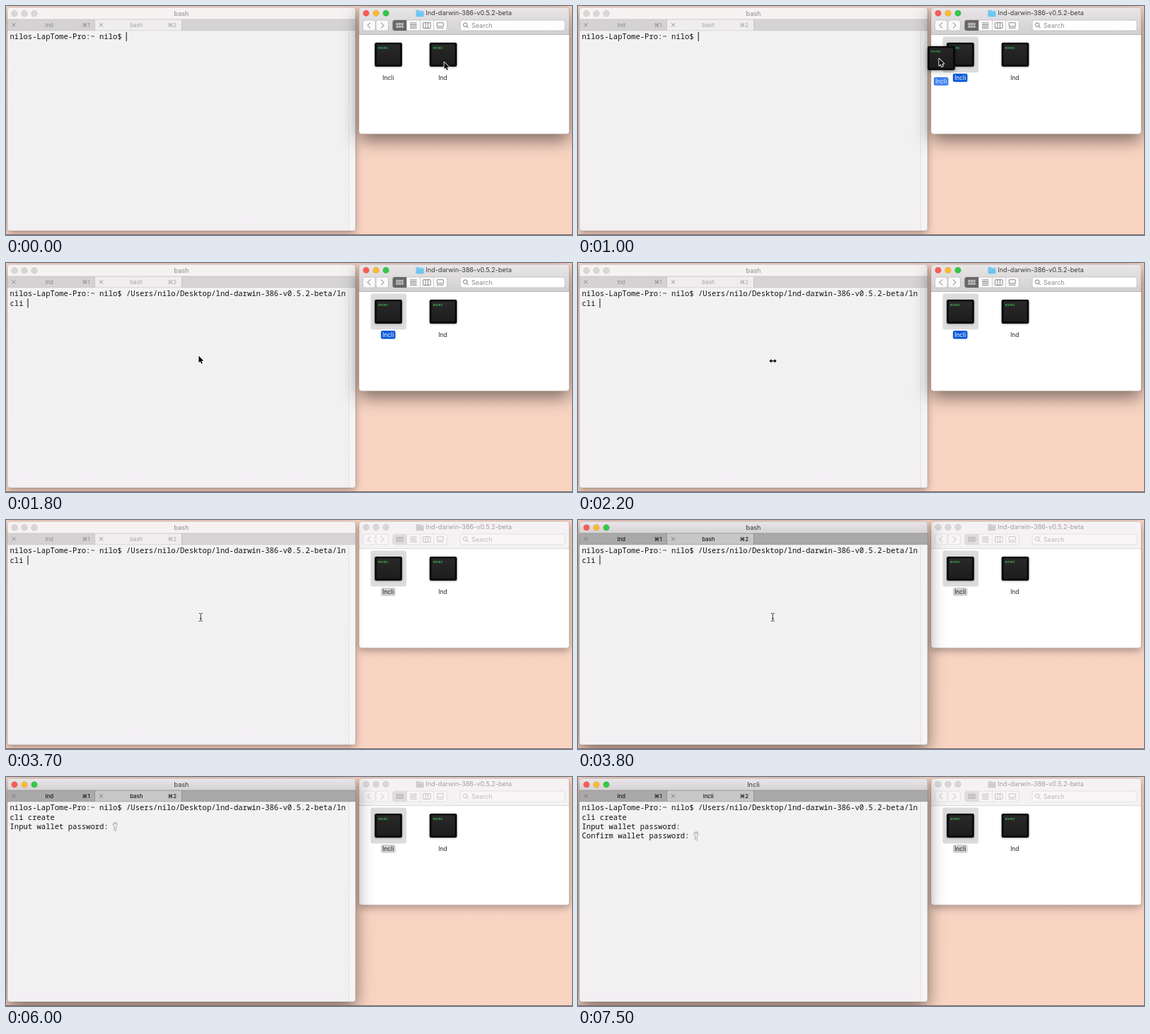
Recreate the animation shown at these times as an HTML page with a canvas. Size 800 px wide and 325 px high, loop 8 s.

```html
<!DOCTYPE html>
<html lang="en">
<head>
<meta charset="utf-8">
<title>Terminal and file window</title>
<style>
html, body { margin: 0; width: 100%; height: 100%; overflow: hidden; background: #f9d3c1; }
canvas { display: block; width: 800px; height: 325px; }
</style>
</head>
<body>
<canvas id="stage"></canvas>
<script>
const W = 800, H = 325, LOOP = 8000, STEP = 100;
const UI = 'Inter, Roboto, sans-serif';
const MONO = '"Noto Sans Mono", "DejaVu Sans Mono", monospace';
const COL = 6.33, LEFT = 5.5, ROW = 13.4;
const PROMPT = 'nilos-LapTome-Pro:~ nilo$ ';
const PATH = '/Users/nilo/Desktop/lnd-darwin-386-v0.5.2-beta/ln';

const canvas = document.getElementById('stage');
const dpr = window.devicePixelRatio || 1;
canvas.width = W * dpr;
canvas.height = H * dpr;
const c = canvas.getContext('2d');
c.scale(dpr, dpr);

// Pointer stops: time, x, y
const pointerPath = [
  [0, 619, 79], [100, 619, 77], [200, 619, 74.5], [500, 619, 74.5],
  [700, 565, 71], [800, 540, 69], [900, 537, 69], [1000, 510, 74],
  [1100, 420, 96], [1200, 315, 118], [1300, 269, 124], [1400, 269, 124],
  [2200, 275, 138]
];

function pointerAt(t) {
  let a = pointerPath[0];
  for (const b of pointerPath) {
    if (t < b[0]) {
      const k = (t - a[0]) / (b[0] - a[0]);
      return [a[1] + (b[1] - a[1]) * k, a[2] + (b[2] - a[2]) * k];
    }
    a = b;
  }
  return [a[1], a[2]];
}

function box(x, y, w, h, r, fill, stroke, lw = 0.8) {
  c.beginPath();
  c.roundRect(x, y, w, h, r);
  if (fill) { c.fillStyle = fill; c.fill(); }
  if (stroke) { c.strokeStyle = stroke; c.lineWidth = lw; c.stroke(); }
}

function rect(x, y, w, h, fill) {
  c.fillStyle = fill;
  c.fillRect(x, y, w, h);
}

function text(s, x, y, size, fill, align = 'left', font = UI, weight = 400) {
  c.font = `${weight} ${size}px ${font}`;
  c.textAlign = align;
  c.fillStyle = fill;
  c.fillText(s, x, y);
}

function line(stroke, lw, ...pts) {
  c.beginPath();
  for (let i = 0; i < pts.length; i += 2) c.lineTo(pts[i], pts[i + 1]);
  c.strokeStyle = stroke;
  c.lineWidth = lw;
  c.stroke();
}

function disc(x, y, r, fill, stroke) {
  c.beginPath();
  c.arc(x, y, r, 0, Math.PI * 2);
  c.fillStyle = fill;
  c.fill();
  if (stroke) { c.strokeStyle = stroke; c.lineWidth = 0.6; c.stroke(); }
}

function fade(y0, y1, top, bottom) {
  const g = c.createLinearGradient(0, y0, 0, y1);
  g.addColorStop(0, top);
  g.addColorStop(1, bottom);
  return g;
}

function frame(x, y, w, h, active, content) {
  c.save();
  c.shadowColor = active ? 'rgba(0,0,0,0.5)' : 'rgba(0,0,0,0.32)';
  c.shadowBlur = (active ? 24 : 11) * dpr;
  c.shadowOffsetY = (active ? 9 : 4) * dpr;
  box(x, y, w, h, 4, '#f3f2f3');
  c.restore();
  c.save();
  c.beginPath();
  c.roundRect(x, y, w, h, 4);
  c.clip();
  content();
  c.restore();
  box(x, y, w, h, 4, null, 'rgba(90,70,70,0.3)', 0.6);
}

function lights(x, y, active) {
  ['#fc5b57', '#fdb92f', '#33c748'].forEach((col, i) =>
    disc(x + 14 * i, y, 4.3, active ? col : '#d9d6d7', active ? 'rgba(0,0,0,0.16)' : '#c8c5c6'));
}

function tab(x, w, name, key, selected, active) {
  const shades = active ? ['#aaa9aa', '#c8c7c8'] : ['#d4d2d3', '#efedee'];
  const ink = active ? '#161616' : selected ? '#a5a3a4' : '#8d8b8c';
  const weight = active ? 500 : 400;
  rect(x, 19, w, 16, shades[+selected]);
  const cross = active ? '#727172' : '#858384';
  line(cross, 0.9, x + 6.5, 24.3, x + 11.5, 29.3);
  line(cross, 0.9, x + 11.5, 24.3, x + 6.5, 29.3);
  text(name, x + w / 2 - 2.5, 29.9, 7.8, ink, 'center', UI, weight);
  text('⌘' + key, x + w - 7, 29.9, 7.8, ink, 'right', UI, weight);
}

function keyIcon(x, y) {
  c.beginPath();
  c.moveTo(x - 1.2, y + 2.7);
  c.lineTo(x - 1.2, y + 8);
  c.lineTo(x + 0.3, y + 9.3);
  c.lineTo(x + 1.6, y + 8);
  c.lineTo(x + 0.9, y + 6.8);
  c.lineTo(x + 1.7, y + 5.7);
  c.lineTo(x + 1.1, y + 2.7);
  c.arc(x, y, 2.9, 1.15, Math.PI * 2 + 1.99 - Math.PI * 2, true);
  c.closePath();
  c.fillStyle = '#f8f8f8';
  c.fill();
  c.strokeStyle = '#858585';
  c.lineWidth = 0.8;
  c.stroke();
  disc(x, y - 1, 0.9, '#f3f3f3', '#858585');
}

function shell(t) {
  const rows = [PROMPT];
  let key = false, caret = true;
  if (t >= 1700) {
    const typed = t < 4000 ? 0 : t < 4400 ? 1 : Math.min(6, 3 + Math.floor((t - 4400) / 100));
    rows[0] += PATH;
    rows.push('cli ' + 'create'.slice(0, typed));
  }
  if (t >= 5000) rows.push('');
  if (t >= 5100) {
    rows[2] = 'Input wallet password: ';
    key = true;
    caret = false;
  }
  if (t >= 7500) rows.push('Confirm wallet password: ');
  rows.forEach((s, i) => text(s, LEFT, 47.2 + ROW * i, COL / 0.6, '#111', 'left', MONO));
  const last = rows.length - 1;
  const x = LEFT + rows[last].length * COL;
  if (caret) rect(x - 0.4, 37 + ROW * last, 1.1, 13, '#222');
  if (key) keyIcon(x + 3.2, 40.6 + ROW * last);
}

function terminal(t, active) {
  const name = t >= 7300 ? 'lncli' : 'bash';
  frame(2, 2, 492, 317, active, () => {
    rect(2, 2, 492, 17, active ? fade(2, 19, '#e9e7e9', '#d3d1d3') : '#f5f2f2');
    lights(12, 10.7, active);
    text(name, 248, 13.8, 9.1, active ? '#333' : '#8b898a', 'center');
    rect(2, 19, 492, 16, active ? '#aaa9aa' : '#d5d3d4');
    tab(2, 123.5, 'lnd', 1, false, active);
    tab(125.5, 122.5, name, 2, true, active);
    const edge = active ? '#8f8e8f' : '#c2c0c1';
    rect(125, 19, 0.8, 16, edge);
    rect(248, 19, 0.8, 16, edge);
    rect(2, 18.6, 492, 0.8, edge);
    rect(2, 34.6, 492, 0.8, edge);
    rect(2, 35.4, 492, 284, fade(35, 319, '#f2f2f2', '#f2f0f2'));
    rect(484, 35.4, 10, 284, '#f5f4f5');
    rect(484, 35.4, 0.8, 284, '#dedddf');
    shell(t);
  });
}

function execIcon(x, y) {
  c.save();
  c.shadowColor = 'rgba(0,0,0,0.4)';
  c.shadowBlur = 2.5 * dpr;
  c.shadowOffsetY = 0.8 * dpr;
  box(x - 19.3, y - 17, 38.6, 34, 2.2, '#080808');
  c.restore();
  rect(x - 16.6, y - 14.6, 33.2, 28.8, fade(y - 15, y + 14, '#292929', '#1d1d1d'));
  text('exec', x - 14.5, y - 8, 6, '#42d95c', 'left', MONO, 500);
}

function label(s, x, y, ink, pill) {
  if (pill) box(x - 10.3, y - 5.8, 20.6, 11.8, 2.5, pill);
  text(s, x, y + 3, 8.5, ink, 'center');
}

function toolbar(active) {
  const edge = active ? '#bdbabc' : '#dedbdc';
  const ink = active ? '#6b696a' : '#bbb8b9';
  const face = active ? '#fbfafb' : '#f7f5f6';
  box(504.5, 20, 17.5, 15, 3, face, edge);
  box(523, 20, 17.5, 15, 3, face, edge);
  line(ink, 1, 515, 23.5, 511, 27.5, 515, 31.5);
  line(ink, 1, 530, 23.5, 534, 27.5, 530, 31.5);

  box(546.5, 20, 77, 15, 3, face, edge);
  box(546.5, 20, 19.5, 15, [3, 0, 0, 3], active ? '#686668' : '#dfdcdd');
  for (const x of [566, 585, 604]) rect(x, 20, 0.7, 15, edge);
  const dot = active ? '#fff' : '#aaa7a8';
  for (let i = 0; i < 6; i++)
    box(551.8 + (i % 3) * 3.6, 24.4 + (i > 2) * 3.8, 2.2, 2.2, 0.3, null, dot, 0.8);
  for (let i = 0; i < 4; i++) rect(571, 23.6 + i * 2.4, 9.5, 0.9, ink);
  box(589.5, 23.7, 10.5, 7.8, 0.5, null, ink);
  line(ink, 0.8, 593, 23.7, 593, 31.5);
  line(ink, 0.8, 596.5, 23.7, 596.5, 31.5);
  box(609.3, 23.7, 9, 5.2, 0.5, null, ink);
  for (let i = 0; i < 4; i++) rect(609 + i * 2.5, 30.6, 1.6, 1.2, ink);

  box(642, 20, 148, 15, 3, active ? '#fff' : '#f8f6f7', edge);
  c.beginPath();
  c.arc(649.2, 26.7, 2.8, 0, Math.PI * 2);
  c.strokeStyle = ink;
  c.lineWidth = 0.9;
  c.stroke();
  line(ink, 1, 651.2, 28.7, 653.7, 31.3);
  text('Search', 658, 30.8, 8.9, active ? '#8b898a' : '#b9b6b7');
}

function files(t, active) {
  frame(499, 2, 297, 179.5, active, () => {
    rect(499, 2, 297, 39, active ? fade(2, 41, '#e9e6e8', '#d2cfd1') : '#f5f2f3');
    rect(499, 40.2, 297, 0.9, active ? '#b5b2b4' : '#d8d5d6');
    rect(499, 41.1, 297, 141, '#fff');
    lights(509, 10.2, active);
    const folder = active ? '#6cc5f1' : '#cecbcc';
    box(579.5, 6, 5, 3, 0.8, folder);
    box(579.5, 7, 11, 8.2, 0.8, folder);
    rect(579.8, 8.3, 10.4, 0.6, 'rgba(255,255,255,0.35)');
    text('lnd-darwin-386-v0.5.2-beta', 593.5, 13.4, 9.1, active ? '#3c3a3b' : '#a19e9f');
    toolbar(active);
    const picked = t >= 900;
    if (picked) box(515.5, 43.5, 50.5, 51, 3, '#dcdcdc');
    execIcon(540.5, 69);
    execIcon(618, 69);
    if (picked) label('lncli', 540.2, 101.8, active ? '#fff' : '#222', active ? '#0a5bd9' : '#d0d0d0');
    else label('lncli', 540.2, 101.8, '#222');
    label('lnd', 617.3, 101.8, '#222');
  });
}

function ghost(x, y, alpha) {
  c.save();
  c.globalAlpha = alpha;
  c.translate(x + 3.5, y);
  c.save();
  c.shadowColor = 'rgba(0,0,0,0.3)';
  c.shadowBlur = 9 * dpr;
  c.shadowOffsetY = 2 * dpr;
  box(-19, -16.5, 38, 33, 2, '#111');
  c.restore();
  execIcon(0, 0);
  label('lncli', -0.3, 32.8, '#fff', '#2a72ee');
  c.restore();
}

function outlined(pts, x, y) {
  c.beginPath();
  for (let i = 0; i < pts.length; i += 2) c.lineTo(x + pts[i], y + pts[i + 1]);
  c.closePath();
  c.lineJoin = 'round';
  c.strokeStyle = '#fff';
  c.lineWidth = 1.8;
  c.stroke();
  c.fillStyle = '#0a0a0a';
  c.fill();
  c.lineJoin = 'miter';
}

function arrow(x, y) {
  outlined([0.4, 0.8, 0.4, 10.6, 2.6, 8.5, 4.1, 12, 5.8, 11.3, 4.3, 7.9, 7.3, 7.8], x, y);
}

function resizer(x, y) {
  outlined([-5.2, 0, -2, -3, -2, -0.8, 2, -0.8, 2, -3, 5.2, 0, 2, 3, 2, 0.8, -2, 0.8, -2, 3], x, y);
}

function beam(x, y) {
  for (const [col, lw] of [['#fff', 2.2], ['#2c2c2c', 1]]) {
    line(col, lw, x - 2.5, y - 5.6, x - 0.8, y - 5.4, x, y - 4.4, x, y + 4.4, x - 0.8, y + 5.4, x - 2.5, y + 5.6);
    line(col, lw, x + 2.5, y - 5.6, x + 0.8, y - 5.4, x, y - 4.4);
    line(col, lw, x + 2.5, y + 5.6, x + 0.8, y + 5.4, x, y + 4.4);
    line(col, lw, x - 1.5, y + 2, x + 1.5, y + 2);
  }
}

function draw(t) {
  rect(0, 0, W, H, fade(0, H, '#f8d2c2', '#f9d4c2'));
  if (t < 3700) {
    terminal(t, false);
    files(t, true);
  } else {
    files(t, false);
    terminal(t, t >= 3800);
  }
  rect(0, 324, W, 1, '#77676a');

  const [x, y] = pointerAt(t);
  if (t >= 1000 && t < 1700) ghost(x, y, t < 1600 ? 0.9 : 0.45);
  if (t < 2200) arrow(x, y);
  else if (t < 3700) resizer(275.5, 139);
  else if (t < 4000) beam(275.3, 138);
}

function tick() {
  const t = performance.now() % LOOP;
  draw(Math.floor(t / STEP) * STEP);
  requestAnimationFrame(tick);
}
tick();
</script>
</body>
</html>
```
